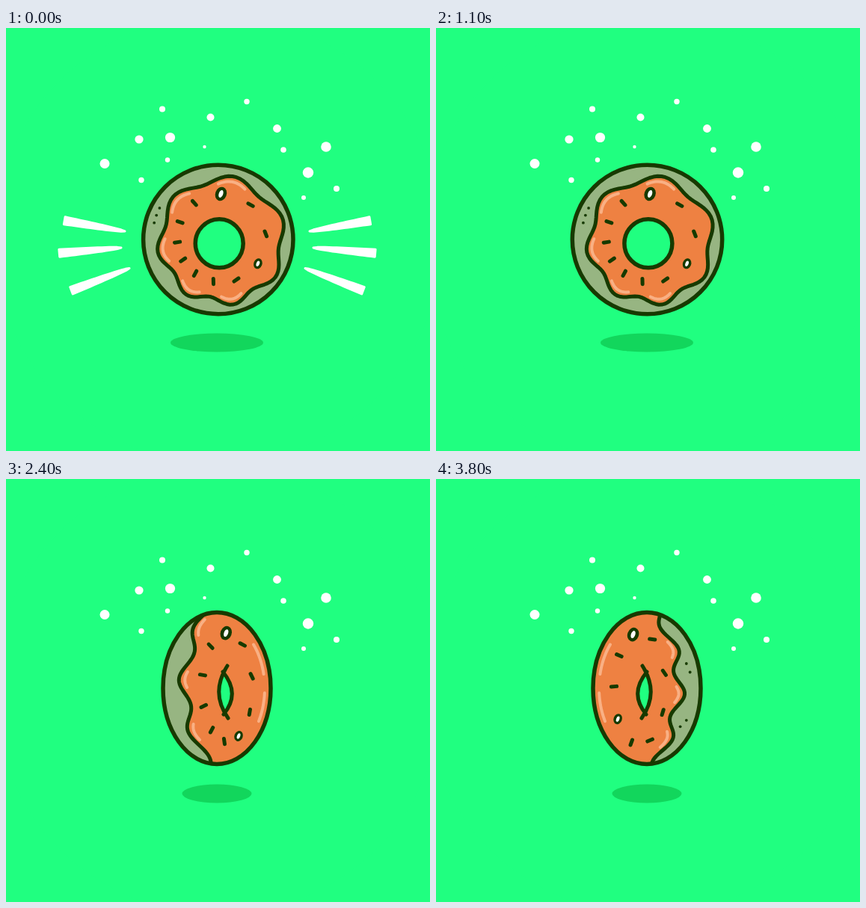
An HTML page that plays this animation: 567x566 px, repeating every 3.9 s.

```html
<!DOCTYPE html>
<html lang="en">
<head>
<meta charset="utf-8">
<title>Spinning donut</title>
<style>
html, body { margin: 0; width: 100%; height: 100%; overflow: hidden; background: #20ff80; }
svg { display: block; width: 567px; height: 566px; }
</style>
</head>
<body>
<svg id="stage" viewBox="0 0 567 566"></svg>
<script>
const BG = '#20ff80', INK = '#173a00', ICING = '#ee8142', DOUGH = '#97b582', SHINE = '#f9b084';
const STEP = 100, LOOP = 3900, SPIN_START = 15, RAYS_END = 8;
const CX = 282, CY = 280, RY = 101.5;
const stage = document.getElementById('stage');
const cos = deg => Math.cos(deg * Math.PI / 180);
const sin = deg => Math.sin(deg * Math.PI / 180);

function el(parent, tag, attrs) {
  const node = document.createElementNS('http://www.w3.org/2000/svg', tag);
  for (const key in attrs) node.setAttribute(key, attrs[key]);
  parent.appendChild(node);
  return node;
}

const shape = (g, d, fill, stroke = 'none', width = 5.5) => el(g, 'path', {
  d, fill, stroke, 'stroke-width': width, 'stroke-linecap': 'round', 'stroke-linejoin': 'round'
});
const oval = (g, cx, cy, rx, ry, fill, stroke = 'none') =>
  el(g, 'ellipse', { cx, cy, rx, ry, fill, stroke, 'stroke-width': 5.5 });

// Path through fn(t) for t between from and to
function trace(fn, from, to, n = 16) {
  const points = [];
  for (let i = 0; i <= n; i++) {
    points.push(fn(from + (to - from) * i / n).map(v => v.toFixed(2)));
  }
  return 'M' + points.join('L');
}

const around = (cx, cy, rx, ry) => deg => [cx + rx * cos(deg), cy + ry * sin(deg)];

function sprinkle(g, x, y, tilt) {
  const dx = 3.6 * cos(tilt), dy = 3.6 * sin(tilt);
  shape(g, `M${x - dx},${y - dy}L${x + dx},${y + dy}`, 'none', INK, 5);
}

function chip(g, x, y, size) {
  const spot = el(g, 'g', { transform: `translate(${x} ${y}) rotate(20) scale(${size})` });
  oval(spot, 0, 0, 7.5, 9.5, INK);
  oval(spot, 0, 0, 2.8, 5.2, '#fff');
}

// Toppings circle the hole, bunched towards one angle
function toppings(g, o) {
  for (let i = 0; i < o.count; i++) {
    const t = o.start + i * 360 / o.count;
    const deg = t + o.shift + o.bunch * cos(t - o.peak);
    const r = o.r + o.swell * cos(deg - o.far);
    const [x, y] = around(o.cx, o.cy, o.rx * r, o.ry * r)(deg);
    if (i === 0) chip(g, x, y, 1);
    else if (i === o.chip) chip(g, x, y, .75);
    else sprinkle(g, x, y, cos(deg) > 0 ? deg + 80 : deg - 10);
  }
}

// Small pores on an arc of the dough
function pores(g, rx, ry, from, step, count) {
  for (let i = 0; i < count; i++) {
    const [x, y] = around(CX, CY, rx, ry)(from + i * step);
    oval(g, x, y, 1.9, 1.9, INK);
  }
}

// Seven soft lobes, wider apart at the upper left
const icing = scale => t => {
  const r = scale * (82 + 5 * cos(7 * (t - 29)) + 4.5 * cos(t - 20));
  return around(284, 283, r, r)(t - 5 + 10 * cos(t));
};

function front(g) {
  oval(g, 283.8, 283, 100.2, 99.7, DOUGH, INK);
  shape(g, trace(icing(1), 0, 360, 120) + 'Z', ICING, INK, 5);
  for (let k = 1; k < 6; k++) {
    const bump = 29 + k * 360 / 7;
    shape(g, trace(icing(.915), bump - 12, bump + 12), 'none', SHINE, 4);
  }
  toppings(g, { cx: 285, cy: 288, rx: 59, ry: 59, count: 11, start: -80, shift: 3, bunch: 12,
    peak: 75, r: 1, swell: .13, far: -65, chip: 3 });
  pores(g, 86, 86, 193, 7, 3);
  oval(g, 285.2, 288.3, 32, 32.5, BG, INK);
}

// Upright donut split by a wavy edge; cover lies beyond it on the given side
function split(g, o) {
  const id = 'clip-' + g.id, outline = { cx: CX, cy: CY, rx: o.rx, ry: RY };
  const bulge = y => 16 + 28 * Math.cos((y - 277) / 62) + 7 * cos(360 * (y - o.phase) / o.period);
  const edge = inset => y => [CX + o.side * (o.depth * bulge(y) - inset), y];
  const far = CX + o.side * 100;
  el(el(g, 'clipPath', { id }), 'ellipse', outline);
  oval(g, CX, CY, o.rx, RY, o.base);
  const part = el(g, 'g', { 'clip-path': `url(#${id})` });
  const wave = trace(edge(0), 170, 390, 80);
  shape(part, `${wave}L${far},390L${far},170Z`, o.cover);
  shape(part, wave, 'none', INK, 5);
  oval(g, CX, CY, o.rx, RY, 'none', INK);
  return edge;
}

// Narrow hole whose inner wall runs past the opening
function lens(g, x, side) {
  const hole = el(g, 'g', { transform: `translate(${x} 286) scale(${side} 1)` });
  shape(hole, 'M-2,-28Q-16,0 0,31Q19,1 -2,-28Z', BG);
  shape(hole, 'M3,-36Q-20,0 4,34M-3,-28Q21,1 -2,29', 'none', INK, 5);
}

function angled(g, o) {
  const edge = split(g, { rx: 72, depth: 1, base: ICING, cover: DOUGH, ...o });
  for (let k = -1; k < 2; k++) {
    const y = o.phase + k * o.period;
    shape(g, trace(edge(8), y - 10, y + 11), 'none', SHINE, 4);
  }
  const rim = around(CX, CY, -o.side * 64, 91);
  shape(g, trace(rim, -40, -12) + trace(rim, 4, 29), 'none', SHINE, 4);
  lens(g, o.hole, -o.side);
  toppings(g, { cx: o.hole, cy: 286, rx: 36, ry: 78, ...o.ring });
}

const faceRight = g => angled(g, { side: -1, phase: 268, period: 70, hole: 293,
  ring: { count: 10, start: -88, shift: 0, bunch: 0, peak: 0, r: .93, swell: .12, far: -50, chip: 4 } });

function faceLeft(g) {
  angled(g, { side: 1, phase: 288, period: 60, hole: 279,
    ring: { count: 9, start: -113, shift: 16, bunch: 17, peak: 85, r: .95, swell: .2, far: 200, chip: 6 } });
  pores(g, 61, 66, -30, 11, 2);
  pores(g, 68, 68, 39, 10, 2);
}

function edgeOn(g) {
  split(g, { rx: 44, side: 1, depth: .45, phase: 288, period: 60, base: DOUGH, cover: ICING });
  pores(g, 24, 60, 140, 30, 3);
}

function backAngled(g) {
  split(g, { rx: 72, side: 1, depth: 1.1, phase: 288, period: 60, base: DOUGH, cover: ICING });
  lens(g, 279, -1);
  pores(g, 46, 60, 120, 35, 4);
}

function back(g) {
  oval(g, CX, 283, 100.2, 99.7, DOUGH, INK);
  oval(g, 280, 288.3, 32, 32.5, BG, INK);
  pores(g, 70, 70, 30, 72, 5);
}

oval(stage, 283.5, 283, 300, 300, BG);
const shadow = oval(stage, CX, 421, 62, 12.5, '#12d65c');

// x, y, radius of each speck
'132,181.5,6.5 178,149,5.6 209,108.5,4 219.5,146.5,6.6 216,176.5,3.2 181,203.5,3.7 265.5,159,2.2 273.5,119.5,5 322,98.5,3.7 362.5,134.5,5.4 371,163,3.8 428,159,6.8 404,193.5,7.2 398,227,3 442,215,4'
  .split(' ').forEach(speck => {
    const [x, y, r] = speck.split(',');
    oval(stage, x, y, r, r, '#fff');
  });

// Brush stroke that widens from its tip
function ray(g, x, y, length, deg) {
  const side = sign => s => {
    const along = s * length, out = sign * 5 * Math.pow(s, .55);
    return [x + along * cos(deg) - out * sin(deg), y + along * sin(deg) + out * cos(deg)];
  };
  const d = trace(side(1), 0, 1) + trace(side(-1), 1, 0).replace('M', 'L') + 'Z';
  shape(g, d, '#fff', '#fff', 3);
}

const MIRROR = `translate(${2 * CX + 1} 0) scale(-1 1)`;
const rays = el(stage, 'g', {});
for (const transform of ['', MIRROR]) {
  const g = el(rays, 'g', { transform });
  ray(g, 159, 272, 82, 190);
  ray(g, 154, 294, 83, 175);
  ray(g, 165, 321.5, 83, 159);
}

// One turn in eighths, beginning just after the front view
const poses = [[faceRight], [edgeOn], [backAngled], [back], [backAngled, MIRROR],
  [edgeOn, MIRROR], [faceLeft], [front]].map(([draw, transform = ''], i) => {
  const g = el(stage, 'g', { id: 'pose' + i, transform });
  draw(g);
  return g;
});
const SHADOW = [46.5, 31, 46.5, 62];
const SHAKE = [0, 2, -1.3];

function show(ms) {
  const tick = Math.floor((ms % LOOP) / STEP);
  const spinning = tick > SPIN_START;
  const pose = spinning ? tick % 8 : 7;
  poses.forEach((g, i) => g.setAttribute('display', i === pose ? 'inline' : 'none'));
  poses[7].setAttribute('transform', `translate(${spinning ? 0 : SHAKE[tick % 3]} 0)`);
  shadow.setAttribute('rx', SHADOW[pose % 4]);
  rays.setAttribute('display', tick < RAYS_END ? 'inline' : 'none');
}

const start = performance.now();
function frame() {
  show(performance.now() - start);
  requestAnimationFrame(frame);
}
show(0);
requestAnimationFrame(frame);
</script>
</body>
</html>
```
